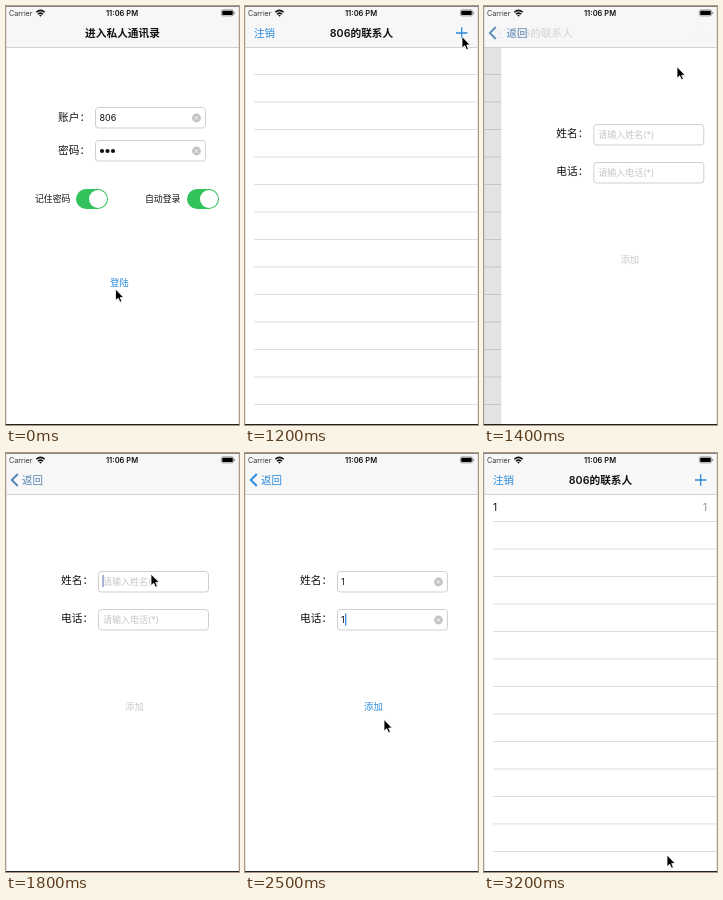
Write an HTML page that moves like this. It is 233 px wide and 419 px high and loops after 3300 ms.

```html
<!DOCTYPE html>
<html lang="zh-CN">
<head>
<meta charset="utf-8">
<style>
  html, body { margin: 0; width: 100%; height: 100%; overflow: hidden; background: #fff; }
  svg { display: block; width: 100vw; height: 100vh; }
  text { font-family: Inter, "Noto Sans CJK SC", "Noto Sans CJK", sans-serif; fill: #111; }
  .blue { fill: #2a8ade; }
  .bold { font-weight: 600; }
  .hint { fill: #c6c6c9; }
</style>
</head>
<body>
<svg id="stage" viewBox="0 0 233 419"></svg>
<script>
const LOOP = 3300, STEP = 100, WIDTH = 233;
const stage = document.getElementById('stage');

const text = (x, y, size, str, attrs = '') =>
  `<text x="${x}" y="${y}" font-size="${size}" ${attrs}>${str}</text>`;
const rect = (x, y, w, h, fill, attrs = '') =>
  `<rect x="${x}" y="${y}" width="${w}" height="${h}" fill="${fill}" ${attrs}/>`;
const group = (id, ...parts) => `<g id="${id}">${parts.join('')}</g>`;
const field = (x, y) => rect(x + .5, y + .5, 110, 20.5, '#fff', 'rx="3" stroke="#cfcfd1"');
const clearIcon = (x, y) =>
  `<circle cx="${x}" cy="${y}" r="4.4" fill="#c3c3c6"/>
   <path d="M${x - 1.7} ${y - 1.7}l3.4 3.4m0-3.4l-3.4 3.4" stroke="#fff" stroke-width=".9"/>`;
const toggle = x =>
  rect(x, 183, 32, 20, '#34c25c', 'rx="10"') + `<circle cx="${x + 22}" cy="193" r="9" fill="#fff"/>`;
const centered = 'text-anchor="middle"';

const login = group('login',
  text(52, 115, 10.7, '账户：'), field(89, 101), text(93.5, 115, 9, '806'), clearIcon(190.5, 112),
  text(52, 148, 10.7, '密码：'), field(89, 134), clearIcon(190.5, 145),
  [96, 101.5, 107].map(x => `<circle cx="${x}" cy="145" r="2.1" fill="#111"/>`).join(''),
  text(29, 196, 8.9, '记住密码'), toggle(70),
  text(139, 196, 8.9, '自动登录'), toggle(181),
  text(113.5, 279.5, 9.4, '登陆', `id="enter" class="blue" ${centered}`));

const lines = Array.from({ length: 13 }, (_, i) => rect(9, 68 + 27.5 * i, 224, .9, '#dadadc')).join('');
const list = group('list', lines,
  group('row', text(9, 58, 10, '1'), text(223, 58, 10, '1', 'text-anchor="end" style="fill:#8e8e93"')));

const inputRow = (key, y, label, hint) =>
  text(55, y + 13, 10.7, label) + field(92, y) +
  text(97, y + 13.5, 9, hint, `id="${key}Hint" class="hint"`) +
  group(key + 'Value', text(96, y + 13.5, 9, '1'), clearIcon(193.5, y + 11));
const form = group('form', rect(0, 0, WIDTH, 419, '#fff'),
  inputRow('name', 118, '姓名：', '请输入姓名(*)'),
  inputRow('phone', 156, '电话：', '请输入电话(*)'),
  text(128.5, 257, 9.4, '添加', `id="add" ${centered}`),
  rect(0, 0, 1.3, 12, '', 'id="caret"'));

const bar = rect(0, 0, WIDTH, 41, '#f7f7f8') + rect(0, 41, WIDTH, .8, '#c6c6c8') +
  text(116.5, 31, 10.7, '进入私人通讯录', `id="loginTitle" class="bold" ${centered}`) +
  group('listBar',
    text(116.5, 31, 10.7, '806的联系人', `id="listTitle" class="bold" ${centered}`),
    text(9, 31, 10.5, '注销', 'id="logout" class="blue"'),
    '<path id="plus" d="M211 27h11.4M216.7 21.3v11.4" stroke="#2a8ade" stroke-width="1.3"/>') +
  group('formBar',
    '<path id="chevron" d="M11.8 21l-6 6 6 6" fill="none" stroke-width="1.9"/>',
    text(16, 31, 10.5, '返回', 'id="back"'));

const status = text(3, 10, 7.2, 'Carrier', 'style="fill:#333"') +
  `<g fill="none" stroke="#111" stroke-width="1.5">
     <path d="M30.3 6.3q4.2-3.8 8.4 0M32 8.2q2.5-2.2 5 0"/></g>
   <path d="M33.2 9.3q1.3-1 2.6 0l-1.3 1.5z" fill="#111"/>` +
  text(116, 10, 7.5, '11:06 PM', `class="bold" ${centered}`) +
  rect(215.4, 3.9, 12.2, 6, 'none', 'rx="1.6" stroke="#777" stroke-width=".7"') +
  rect(216.2, 4.7, 10.6, 4.4, '#000', 'rx="1"') + rect(228.3, 6, .8, 2, '#777');

const frame = rect(0, 0, .6, 419, '#d4d4d4') + rect(232.4, 0, .6, 419, '#d4d4d4') +
  rect(0, 0, WIDTH, .7, '#555') + rect(0, 418, WIDTH, 1, '#222');

const pointer = `<path id="pointer" d="M0 0V11.6L2.7 9.2 4.5 13.2 6.4 12.4 4.7 8.5H8.2Z"
  fill="#000" stroke="#fff" stroke-width=".8"/>`;

stage.innerHTML = rect(0, 0, WIDTH, 419, '#fff') + login + list +
  rect(0, 42, WIDTH, 377, '#000', 'id="shade"') + form + bar + status + frame + pointer;

const el = id => document.getElementById(id);
const show = (id, on) => el(id).style.display = on ? '' : 'none';
const fade = (id, value) => el(id).style.opacity = value;
const move = (id, x, y = 0) => el(id).setAttribute('transform', `translate(${x} ${y})`);

// Pointer stops: time, x, y
const stops = [
  [0, 109.5, 283], [300, 112, 276], [500, 112, 276], [600, 112, 276], [1100, 217, 30.5],
  [1300, 217, 30.5], [1600, 145, 121], [1900, 145, 121], [2200, 143, 166],
  [2300, 143, 166], [2500, 139, 266.5], [2700, 139, 266.5], [3200, 183, 402]
];

function pointerAt(t) {
  const i = Math.max(1, stops.findIndex(s => s[0] >= t));
  const [t0, x0, y0] = stops[i - 1], [t1, x1, y1] = stops[i];
  const k = (t - t0) / (t1 - t0);
  return [x0 + (x1 - x0) * k, y0 + (y1 - y0) * k];
}

// Ease-out of a screen slide that begins at the given time
const slide = (t, start) => 1 - (1 - Math.min(1, Math.max(0, (t - start) / 345))) ** 3;

function draw(t) {
  const p = slide(t, 1200) - slide(t, 2600);
  const atLogin = t < 500, named = t >= 2000, phoned = t >= 2300;

  show('login', atLogin);
  show('loginTitle', atLogin);
  show('list', !atLogin);
  show('listBar', !atLogin);
  show('form', p > 0);
  show('formBar', p > 0);
  show('row', t >= 2600);
  fade('enter', t === 200 ? .4 : 1);

  move('list', -.3 * WIDTH * p);
  move('form', WIDTH * (1 - p));
  fade('shade', .117 * p);

  move('listTitle', -64 * p);
  fade('listTitle', 1 - p ** 1.5);
  fade('logout', 1 - p);
  fade('plus', (1 - p) ** 2);
  move('back', 86 * (1 - p));
  fade('back', p);
  fade('chevron', p);
  const tint = named ? '#2a8ade' : '#5585b4';
  el('back').style.fill = el('chevron').style.stroke = tint;

  show('nameHint', !named);
  show('nameValue', named);
  show('phoneHint', !phoned);
  show('phoneValue', phoned);
  el('add').style.fill = phoned ? '#2a8ade' : '#c8c8ca';
  fade('add', t === 2600 ? .4 : 1);

  show('caret', t >= 1800);
  el('caret').style.fill = named ? '#3f83dc' : '#7c91c6';
  const onPhone = t >= 2200;
  move('caret', (onPhone ? phoned : named) ? 100 : 96.4, onPhone ? 160.5 : 122);

  move('pointer', ...pointerAt(t));
}

function tick() {
  draw(Math.floor(performance.now() % LOOP / STEP) * STEP);
  requestAnimationFrame(tick);
}
tick();
</script>
</body>
</html>
```
